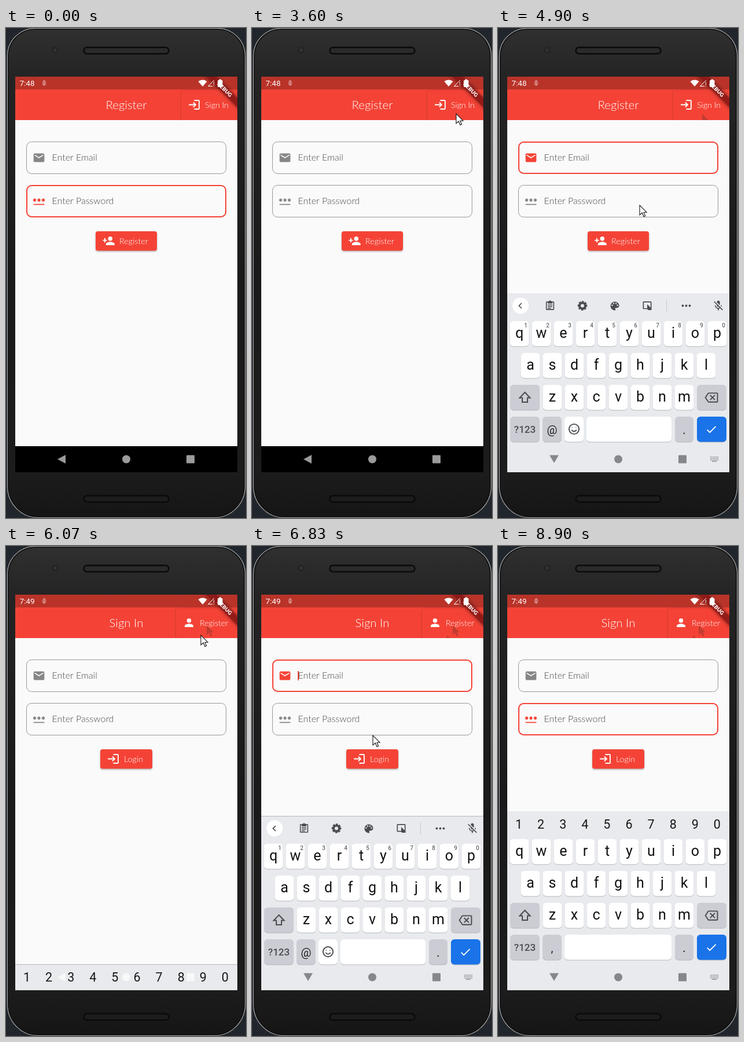
Animation of 415x846 px, one loop 9040 ms. Source, as an HTML page with a canvas:

```html
<!DOCTYPE html>
<html lang="en">
<head>
<meta charset="utf-8">
<title>Sign in and register</title>
<style>
html, body { margin: 0; width: 100%; height: 100%; overflow: hidden; background: #20262c; }
canvas { display: block; }
</style>
</head>
<body>
<canvas id="stage" width="415" height="846"></canvas>
<script>
const ctx = document.getElementById('stage').getContext('2d');
const LOOP = 9040;
const RED = '#f44336', GREY = '#868686', INK = '#484b50';
const UI = 'Lato, "Open Sans", sans-serif', SYS = 'Roboto, sans-serif';

const ICONS = {
  email: 'M20 4H4c-1.1 0-2 .9-2 2v12c0 1.1.9 2 2 2h16c1.1 0 2-.9 2-2V6c0-1.1-.9-2-2-2zm0 4l-8 5-8-5V6l8 5 8-5z',
  login: 'M11 7L9.6 8.4l2.6 2.6H2v2h10.2l-2.6 2.6L11 17l5-5zm9 12h-8v2h8c1.1 0 2-.9 2-2V5c0-1.1-.9-2-2-2h-8v2h8z',
  person: 'M8 8a4 4 0 1 0 8 0a4 4 0 1 0-8 0zM12 14c-2.67 0-8 1.34-8 4v2h16v-2c0-2.66-5.33-4-8-4z',
  addPerson: 'M11 8a4 4 0 1 0 8 0a4 4 0 1 0-8 0zM6 10V7H4v3H1v2h3v3h2v-3h3v-2zM15 14c-2.67 0-8 1.34-8 4v2h16v-2c0-2.66-5.33-4-8-4z',
  clipboard: 'M19 3h-4.2a3 3 0 0 0-5.6 0H5c-1.1 0-2 .9-2 2v15c0 1.1.9 2 2 2h14c1.1 0 2-.9 2-2V5c0-1.1-.9-2-2-2zm0 17H5V5h2v3h10V5h2zM7 10h10v2H7zM7 13.5h10v2H7zM7 17h7v2H7z',
  palette: 'M12 3a9 9 0 0 0 0 18c.83 0 1.5-.67 1.5-1.5 0-.9-.8-1-.8-2 0-.83.7-1.5 1.5-1.5H16c2.76 0 5-2.24 5-5 0-4.42-4-8-9-8zM5 10.5a1.5 1.5 0 1 0 3 0a1.5 1.5 0 1 0-3 0zM8 6.5a1.5 1.5 0 1 0 3 0a1.5 1.5 0 1 0-3 0zM13 6.5a1.5 1.5 0 1 0 3 0a1.5 1.5 0 1 0-3 0zM16 10.5a1.5 1.5 0 1 0 3 0a1.5 1.5 0 1 0-3 0z',
  sticker: 'M5 3h14c1.1 0 2 .9 2 2v16h-7l-2-2H5c-1.1 0-2-.9-2-2V5c0-1.1.9-2 2-2zm0 2v12h7V9l7 7V5z',
  micOff: 'M19 11h-1.7c0 .74-.16 1.43-.43 2.05l1.23 1.23c.56-.98.9-2.09.9-3.28zm-4 0V5a3 3 0 0 0-6 0v.18zM4.27 3L3 4.27l6 6V11c0 2 1.8 3.3 3.65 2.92l1.66 1.66c-3.5 1.6-7.6-.6-7.6-4.58H5c0 3.41 2.72 6.23 6 6.72V21h2v-3.28c.91-.13 1.77-.45 2.54-.9L19.73 21 21 19.73z',
  backspace: 'M22 3H7c-.69 0-1.23.35-1.59.88L0 12l5.41 8.11c.36.53.9.89 1.59.89h15c1.1 0 2-.9 2-2V5c0-1.1-.9-2-2-2zm0 16H7.07L2.4 12l4.66-7H22zm-11.59-2L14 13.41 17.59 17 19 15.59 15.41 12 19 8.41 17.59 7 14 10.59 10.41 7 9 8.41 12.59 12 9 15.59z',
  check: 'M9 16.2L4.8 12l-1.4 1.4L9 19 21 7l-1.4-1.4z',
  shift: 'M12 3L3 12.5h4.5V20h9v-7.5H21z',
  smile: 'M3 12a9 9 0 1 0 18 0a9 9 0 1 0-18 0M8 9h1M15 9h1M7.5 13.5q4.5 5.5 9 0',
  chevron: 'M14.5 6L8.5 12l6 6',
  stars: [4, 12, 20].map(x => `M${x} 7v6M${x - 2.6} 8.5l5.2 3M${x + 2.6} 8.5l-5.2 3`).join('') + 'M2 18h20',
  flower: 'M12 2l-4 4 4 4 4-4zM5 10l7 6 7-6M6 16q6 8 12 0'
};
for (const name in ICONS) ICONS[name] = new Path2D(ICONS[name]);
const ARROW = new Path2D('M0 0V16.8L4.2 13L7 19.5L9.6 18.4L7 12.2H12Z');

// Pointer positions: time, x, y
const POINTER = [
  [390, 375, 840], [1150, 358, 145], [3530, 358, 145], [3600, 353, 148],
  [4100, 240, 222], [4570, 240, 228], [4900, 245, 306], [5040, 245, 306],
  [5790, 347, 137], [5930, 347, 137], [6070, 337, 154], [6140, 337, 154],
  [6420, 215, 222], [6830, 209, 327], [7110, 209, 326], [7860, 209, 326], [8700, 408, 838]
];
const CARET_ON = [[390, 890], [4100, 4600], [5040, 5540], [6420, 6920], [7400, 7900], [8400, 8900]];
const PRESSES = [[1550, 1690], [2620, 2690], [5860, 5930]];

const within = (t, spans) => spans.some(([a, b]) => t >= a && t < b);
const clamp = v => Math.max(0, Math.min(1, v));

function box(x, y, w, h, r, fill) {
  ctx.beginPath();
  ctx.roundRect(x, y, w, h, r);
  if (fill) { ctx.fillStyle = fill; ctx.fill(); }
}

function outline(color, width) {
  ctx.strokeStyle = color;
  ctx.lineWidth = width;
  ctx.stroke();
}

function disc(x, y, r, color) {
  ctx.beginPath();
  ctx.arc(x, y, r, 0, 7);
  ctx.fillStyle = color;
  ctx.fill();
}

function polygon(color, ...points) {
  ctx.beginPath();
  points.forEach(p => ctx.lineTo(...p));
  ctx.closePath();
  ctx.fillStyle = color;
  ctx.fill();
}

function text(str, x, y, font, color, align = 'left') {
  ctx.font = font;
  ctx.fillStyle = color;
  ctx.textAlign = align;
  ctx.fillText(str, x, y);
}

// Icons live on a 24-unit grid; a stroke width draws them as lines.
function icon(name, x, y, size, color, stroke) {
  ctx.save();
  ctx.translate(x - size / 2, y - size / 2);
  ctx.scale(size / 24, size / 24);
  ctx.fillStyle = ctx.strokeStyle = color;
  ctx.lineWidth = stroke;
  if (stroke) ctx.stroke(ICONS[name]);
  else ctx.fill(ICONS[name], 'evenodd');
  ctx.restore();
}

function withShadow(color, blur, dy, draw) {
  ctx.save();
  ctx.shadowColor = color;
  ctx.shadowBlur = blur;
  ctx.shadowOffsetY = dy;
  draw();
  ctx.restore();
}

function clipped(x, y, w, h, draw) {
  ctx.save();
  ctx.beginPath();
  ctx.rect(x, y, w, h);
  ctx.clip();
  draw();
  ctx.restore();
}

function phone() {
  ctx.fillStyle = '#20262c';
  ctx.fillRect(0, 0, 415, 846);
  const body = ctx.createLinearGradient(0, 0, 0, 846);
  [[0, '#303030'], [.1, '#242424'], [.5, '#1a1a1a'], [.91, '#1c1c1c'], [1, '#151515']]
    .forEach(stop => body.addColorStop(...stop));
  box(2.5, .5, 411, 845, [48, 48, 54, 54], body);
  outline('#a0a0a0', 1.4);
  box(4.2, 2.2, 407.6, 841.6, [46, 46, 52, 52]);
  outline('#101010', 1.6);
  for (const [y, fill] of [[33, '#2a2a2a'], [807, '#1c1c1c']]) {
    box(134.5, y + .5, 147, 11, 5.5, fill);
    outline('#0a0a0a', 2.5);
  }
  disc(85, 38, 6, '#252525');
  disc(85, 38, 2.5, '#33363a');
}

function statusBar(t) {
  text(t < 5300 ? '7:48' : '7:49', 23.5, 100, '13.5px ' + SYS, '#fff');
  icon('flower', 66, 95, 11, '#fff', 2);
  ctx.beginPath();
  ctx.moveTo(340, 101);
  ctx.arc(340, 101, 11.5, -Math.PI * .73, -Math.PI * .27);
  ctx.fillStyle = '#fff';
  ctx.fill();
  ctx.beginPath();
  ctx.moveTo(357, 100.5);
  ctx.lineTo(349.5, 100.5);
  ctx.lineTo(360, 90);
  outline('#fff', 1);
  text('!', 358, 101, '10px ' + SYS, '#fff');
  box(366, 90, 8.5, 12, 1.5, '#fff');
  ctx.fillRect(368.5, 88.5, 3.5, 2);
}

function ribbon() {
  ctx.save();
  ctx.translate(400, 84);
  ctx.rotate(Math.PI / 4);
  withShadow('rgba(0,0,0,.6)', 6, 0, () => {
    ctx.fillStyle = 'rgba(150,26,24,.85)';
    ctx.fillRect(-60, 26, 120, 11.5);
  });
  text('DEBUG', 0, 34.4, '900 9.2px ' + UI, '#fff', 'center');
  ctx.restore();
}

function appBar(t, signIn) {
  ctx.fillStyle = '#b93329';
  ctx.fillRect(16, 84, 384, 22);
  ctx.fillStyle = RED;
  ctx.fillRect(16, 106, 384, 53);
  const left = signIn ? 294 : 303;
  clipped(16, 106, 384, 53, () => {
    withShadow('rgba(0,0,0,.35)', 2.5, .5, () => box(left, 108, 110, 51, 3, RED));
    if (within(t, PRESSES)) box(left, 108, 110, 51, 3, 'rgba(255,255,255,.12)');
  });
  text(signIn ? 'Sign In' : 'Register', 208, 139.5, '300 20.4px ' + UI, '#fff', 'center');
  icon(signIn ? 'person' : 'login', left + 22.5, 132.5, 22.4, '#fff');
  text(signIn ? 'Register' : 'Sign In', left + 41, 137.5, '300 14.2px ' + UI, '#fff');
  // Faint pointer trails left on the bar
  const trail = t >= 5930 ? [[347, 137], [337, 154]] : t >= 3670 ? [[353, 148]] : [];
  trail.slice(0, t < 6140 ? 1 : 2).forEach(p =>
    clipped(16, 106, 384, 53, () => arrow(...p, 'rgba(120,50,45,.4)')));
}

function field(label, y, focused, caret) {
  const inset = focused ? 1 : .5;
  box(35 + inset, y + inset, 346 - 2 * inset, 56 - 2 * inset, 9.3 - inset);
  outline(focused ? RED : '#989898', 2 * inset);
  const color = focused ? RED : GREY;
  if (label === 'Email') icon('email', 57, y + 28, 22.4, color);
  else icon('stars', 57, y + 28, 22.4, color, 1.8);
  text('Enter ' + label, 79.5, y + 33, '300 16px ' + UI, '#484848');
  if (focused && caret) {
    ctx.fillStyle = RED;
    ctx.fillRect(79, y + 20, 2, 16);
  }
}

function submitButton(signIn) {
  const x = signIn ? 163 : 155;
  withShadow('rgba(0,0,0,.3)', 3, 1.5, () => box(x, 351, 416 - 2 * x, 33.5, 4, RED));
  icon(signIn ? 'login' : 'addPerson', x + 22.5, 367.5, 22.4, '#fff');
  text(signIn ? 'Login' : 'Register', x + 41, 373, '300 14.4px ' + UI, '#fff');
}

function key(x, y, w, fill) {
  box(x, y + 1, w, 43.5, 6, '#b4b7bb');
  box(x, y, w, 43.5, 6, fill);
}

function toolbar() {
  disc(39, 479.5, 14, '#fff');
  icon('chevron', 39, 479.5, 18, INK, 2.2);
  icon('clipboard', 90, 479, 19, INK);
  icon('palette', 202, 480, 20, INK);
  icon('sticker', 258, 479.5, 20, INK);
  icon('micOff', 381, 479.5, 21, INK);
  ctx.beginPath();
  ctx.arc(146, 479.5, 4.8, 0, 7);
  outline(INK, 3.6);
  ctx.save();
  ctx.setLineDash([3.6, Math.PI * 7 / 4 - 3.6]);
  ctx.beginPath();
  ctx.arc(146, 479.5, 7, -.25, Math.PI * 2 - .25);
  outline(INK, 2.6);
  ctx.restore();
  ctx.fillStyle = '#c6c8cb';
  ctx.fillRect(291, 469, 1, 21);
  for (const x of [319.5, 325.5, 331.5]) disc(x, 479.5, 1.9, INK);
}

function keyboard(shift, digits) {
  const special = '#cccdd4';
  ctx.save();
  ctx.translate(0, shift);
  ctx.fillStyle = '#e8eaed';
  ctx.fillRect(16, 458, 384, 400);
  if (shift) {
    ctx.fillStyle = '#b5b7ba';
    ctx.fillRect(16, 458, 384, 1);
  }
  if (!digits) toolbar();
  [...'1234567890'].forEach((d, i) => {
    if (digits) text(d, 36 + 38.1 * i, 488, '21.5px ' + SYS, '#161616', 'center');
  });
  ['qwertyuiop', 'asdfghjkl', 'zxcvbnm'].forEach((row, r) => {
    const start = [37, 56, 94][r], y = 506 + 55 * r;
    [...row].forEach((letter, i) => {
      const x = start + 38 * i;
      key(x - 16.5, y, 33, '#fff');
      text(letter, x, y + 29, '25px ' + SYS, '#111', 'center');
      if (!r && !digits) text((i + 1) % 10, x + 11, y + 11, '500 10px ' + SYS, '#666', 'center');
    });
  });
  key(21, 616, 51, special);
  icon('shift', 46.5, 638, 24, INK, 2);
  key(344, 616, 51, special);
  icon('backspace', 369, 638, 23, INK);
  key(21, 671, 51, special);
  text('?123', 46.5, 699, '500 17px ' + SYS, INK, 'center');
  key(77, 671, 33, special);
  text(digits ? ',' : '@', 93.5, 701, '20px ' + SYS, '#222', 'center');
  if (!digits) {
    key(115, 671, 33, '#fff');
    icon('smile', 131.5, 692.5, 23, INK, 2);
  }
  const space = digits ? 115 : 153;
  key(space, 671, 300 - space, '#fff');
  key(306, 671, 32, special);
  text('.', 322, 701, '22px ' + SYS, '#222', 'center');
  key(344, 671, 51, '#1a73e8');
  icon('check', 369, 693, 22, '#fff');
  ctx.restore();
}

function navBar(shown, closing) {
  if (!shown) {
    ctx.fillStyle = '#000';
    ctx.fillRect(16, 722, 384, 45);
  }
  const color = closing ? '#f8f8f8' : shown ? '#85878a' : '#9a9a9a';
  if (shown && !closing) {
    polygon(color, [89, 737.5], [105, 737.5], [97, 751]);
    for (let i = 0; i < 18; i++) {
      ctx.fillRect(367 + (i % 6) * 2.5, 740 + Math.floor(i / 6) * 2.6, 1.5, 1.5);
    }
    ctx.fillRect(370, 747.6, 8, 1.3);
  } else {
    polygon(color, [89, 744.5], [103, 737], [103, 752]);
  }
  disc(208, 744.5, 7, color);
  box(312, 737.5, 14, 14, 1, color);
}

function arrow(x, y, ghost) {
  ctx.save();
  ctx.translate(x, y);
  ctx.fillStyle = ghost || '#fff';
  ctx.fill(ARROW);
  if (!ghost) {
    ctx.strokeStyle = '#111';
    ctx.lineWidth = 1.1;
    ctx.stroke(ARROW);
  }
  ctx.restore();
}

function pointer(t) {
  const next = POINTER.findIndex(p => p[0] > t);
  if (next < 1) return;
  const [t0, x0, y0] = POINTER[next - 1], [t1, x1, y1] = POINTER[next];
  const p = (t - t0) / (t1 - t0), e = p * p * (3 - 2 * p);
  arrow(x0 + (x1 - x0) * e, y0 + (y1 - y0) * e);
}

function keyboardShift(t) {
  const rise = start => 309 * (1 - clamp((t - start) / 300)) ** 3;
  if (t < 5930) return rise(4300);
  if (t < 6140) return 264 * clamp((t - 5930) / 140) ** 1.5;
  return rise(6620);
}

function screen(t) {
  const signIn = within(t, [[1690, 2690], [5930, LOOP]]);
  const emailFocus = within(t, [[4100, 5040], [6420, 7300]]);
  const passwordFocus = within(t, [[0, 1690], [5040, 5930], [7300, LOOP]]);
  const shown = within(t, [[4300, 6140], [6620, LOOP]]);
  const caret = within(t, CARET_ON);

  ctx.fillStyle = '#fafafa';
  ctx.fillRect(16, 84, 384, 683);
  appBar(t, signIn);
  ribbon();
  statusBar(t);
  field('Email', 196, emailFocus, caret);
  field('Password', 271, passwordFocus, caret);
  submitButton(signIn);
  if (shown) keyboard(keyboardShift(t), within(t, [[5150, 6140], [7500, LOOP]]));
  navBar(shown, within(t, [[5930, 6140]]));
}

function draw(t) {
  phone();
  clipped(16, 84, 384, 683, () => screen(t));
  pointer(t);
}

const begin = performance.now();
function frame() {
  draw((performance.now() - begin) % LOOP);
  requestAnimationFrame(frame);
}
frame();
</script>
</body>
</html>
```
